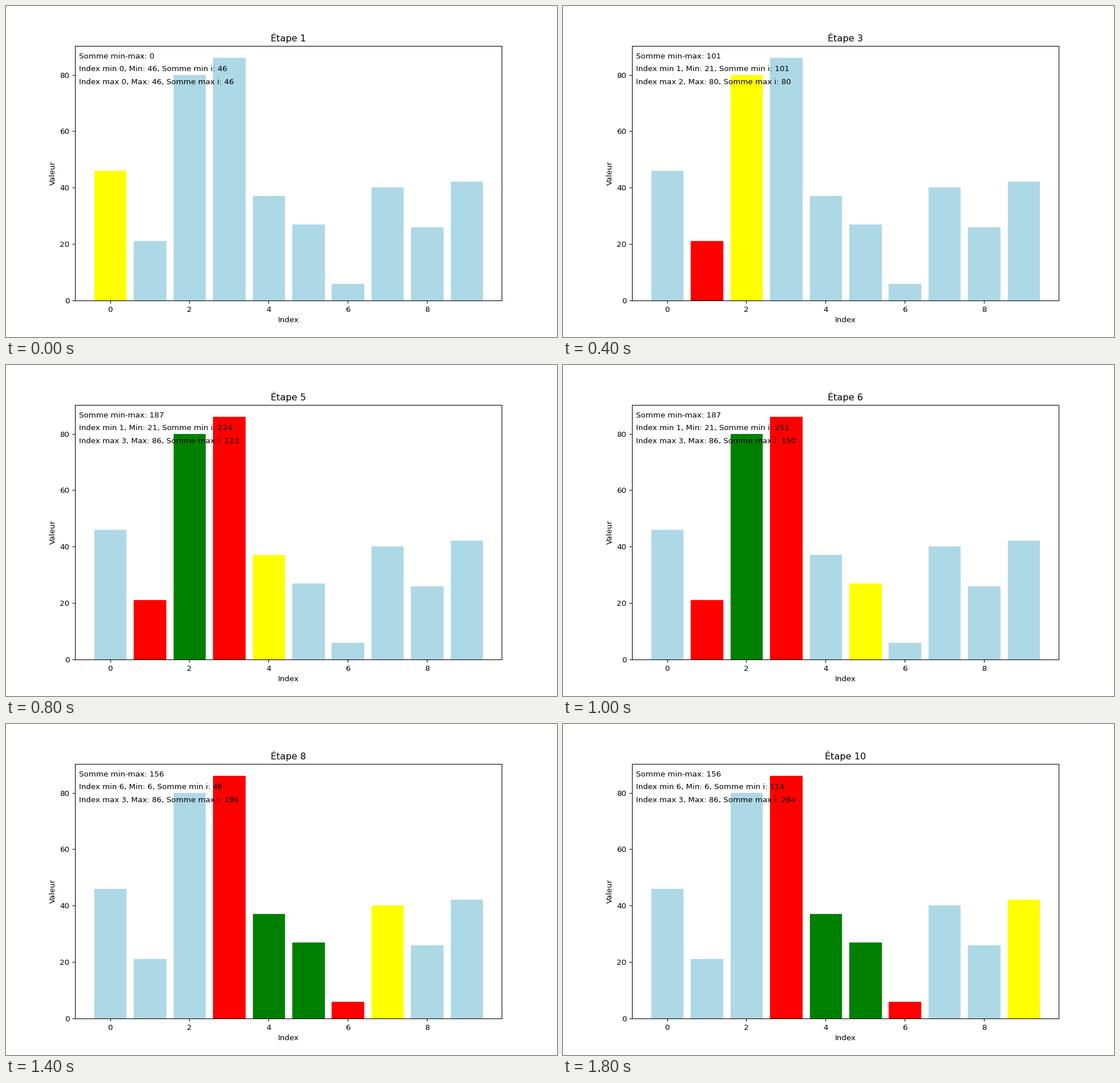
Recreate the animation shown at these times as a matplotlib script. Size 966 px wide and 580 px high, loop 2 s.

```python
import matplotlib.pyplot as plt
from matplotlib.animation import FuncAnimation

VALUES = [46, 21, 80, 86, 37, 27, 6, 40, 26, 42]
DPI = 96

plt.rcParams["font.family"] = "DejaVu Sans"
plt.rcParams["font.size"] = 10.0625


def scan(values):
    """Track the running extremes and the sum of the span between them."""
    lo = hi = 0
    sum_lo = sum_hi = values[0]
    span = 0
    states = [(lo, hi, sum_lo, sum_hi, span)]
    for i, v in enumerate(values[1:], 1):
        sum_lo += v
        sum_hi += v
        if v < values[lo]:
            lo, sum_lo, span = i, v, sum_hi
        elif v > values[hi]:
            hi, sum_hi, span = i, v, sum_lo
        states.append((lo, hi, sum_lo, sum_hi, span))
    return states


def bar_color(i, current, lo, hi):
    if i == current:
        return "yellow"
    if i in (lo, hi):
        return "red"
    if min(lo, hi) < i < max(lo, hi):
        return "green"
    return "lightblue"


STATES = scan(VALUES)

fig, ax = plt.subplots(figsize=(966 / DPI, 580 / DPI), dpi=DPI)
bars = ax.bar(range(len(VALUES)), VALUES, color="lightblue")
ax.set_xlabel("Index")
ax.set_ylabel("Valeur")
title = ax.set_title("")
span_text, min_text, max_text = [
    ax.text(0.01, y, "", transform=ax.transAxes) for y in (0.95, 0.90, 0.85)
]


def update(step):
    lo, hi, sum_lo, sum_hi, span = STATES[step]
    for i, bar in enumerate(bars):
        bar.set_color(bar_color(i, step, lo, hi))
    title.set_text(f"Étape {step + 1}")
    span_text.set_text(f"Somme min-max: {span}")
    min_text.set_text(f"Index min {lo}, Min: {VALUES[lo]}, Somme min i: {sum_lo}")
    max_text.set_text(f"Index max {hi}, Max: {VALUES[hi]}, Somme max i: {sum_hi}")
    return [*bars, title, span_text, min_text, max_text]


anim = FuncAnimation(fig, update, frames=len(VALUES), interval=200,
                     repeat=True, repeat_delay=0, blit=False)
plt.show()
```
